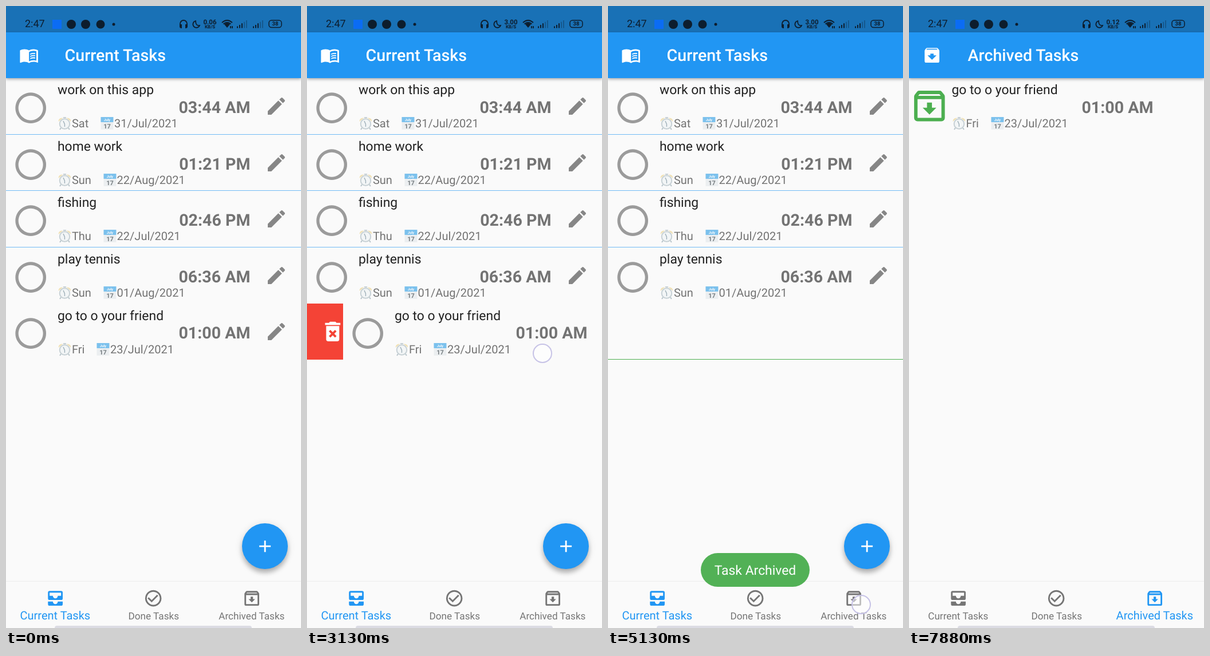
Write an HTML page that moves like this. It is 515 by 1087 pixels and loops after 8 s.

```html
<!DOCTYPE html>
<html lang="en">
<head>
<meta charset="utf-8">
<title>Task list</title>
<style>
  html, body { margin: 0; width: 100%; height: 100%; overflow: hidden; background: #fafafa; }
  #stage { position: absolute; inset: 0; overflow: hidden; font: 20px/0 Roboto, sans-serif; color: #737373;
    text-rendering: geometricPrecision; }
  #stage div, #stage svg { position: absolute; }
  .text { white-space: pre; line-height: 0; }
  .mid { transform: translateX(-50%); }

  #status { width: 100%; height: 46px; background: #1971b6; color: #0d1d2d; }
  #bar { top: 46px; width: 100%; height: 80px; background: #2196f3; box-shadow: 0 2px 5px #0005; }
  .heading { left: 102.6px; top: 40.2px; font-size: 28.6px; font-weight: 500; color: #fff; }

  .page { top: 126px; width: 100%; height: 880px; }
  .row, .front { width: 515px; height: 97.4px; overflow: hidden; }
  .front { background: #fafafa; }
  .title { top: 21.2px; font-size: 22.9px; color: #212121; }
  #stage .when { top: 79.2px; display: flex; align-items: center; height: 0; white-space: pre; }
  #stage .when svg { position: static; flex: none; opacity: .62; }
  .time { right: 88.5px; top: 51.1px; font-size: 28.6px; font-weight: 700; }
  .rule { width: 100%; height: 1px; background: #72bbf4; }
  .under { width: 100%; height: 100%; }
  .cover { width: 100%; height: 100%; background: #fafafa; transform-origin: bottom; }

  #fab { left: 412px; top: 904px; width: 80px; height: 80px; border-radius: 50%; background: #2196f3;
    box-shadow: 0 7px 10px -1px #0004, 0 2px 14px #0002; }
  #nav { top: 1006px; width: 100%; height: 81px; background: #fafafa; box-shadow: 0 -1px 1px #0000000c; }
  .tab { width: 171.67px; height: 81px; top: 0; color: #757575; }
  .label { width: 100%; top: 59px; text-align: center; transform: scale(.857); transform-origin: 50% 9px; }
  #home { left: 85px; top: 1083px; width: 344px; height: 8px; border-radius: 4px; background: #dcdce4; }
  #toast { left: 162px; top: 956px; width: 190px; height: 59px; border-radius: 30px; background: #4caf50f6; }
  .touch { width: 30px; height: 30px; margin: -17px; border: 2px solid #c6c2e6; border-radius: 50%; background: #fff8; }

  .swipeAway { animation: swipeAway 8s linear infinite; }
  .peek { animation: peek 8s linear infinite; }
  .leave { animation: leave 8s linear infinite; }
  .enter { animation: enter 8s linear infinite; }
  .red { animation: red 8s linear infinite; }
  .cover { animation: cover 8s linear infinite; }
  .lastRule { animation: lastRule 8s linear infinite; }
  #toast { animation: toast 8s linear infinite; }
  .off { animation: off 8s linear infinite; }
  .on { animation: on 8s linear infinite; }
  .off .label { animation: shrink 8s linear infinite; }
  .on .label { animation: grow 8s linear infinite; }
  #touch1 { left: 348px; top: 607px; animation: swipeAway 8s linear infinite, touch1 8s linear infinite; }
  #touch2 { left: 442px; top: 1046px; animation: touch2 8s linear infinite; }
  #touch3 { left: 390px; top: 217px; animation: peek 8s linear infinite, touch3 8s linear infinite; }

  @keyframes swipeAway {
    0%, 34.4% { transform: none; }
    37.5% { transform: translateX(50px); }
    39.06% { transform: translateX(63px); }
    40.6% { transform: translateX(66px); }
    43.75% { transform: none; }
    46.9% { transform: translateX(-140px); }
    50% { transform: translateX(-280px); }
    52.5%, to { transform: translateX(-516px); }
  }
  @keyframes peek {
    0%, 71.9% { transform: none; }
    78.12% { transform: translateX(-195px); }
    79.7% { transform: translateX(-205px); }
    84.4%, to { transform: none; }
  }
  @keyframes leave { 0%, 65.6% { opacity: 1; } 65.61%, to { opacity: 0; } }
  @keyframes enter { 0%, 65.6% { opacity: 0; } 65.61%, to { opacity: 1; } }
  @keyframes red { 0%, 43.75% { opacity: 1; } 43.76%, to { opacity: 0; } }
  @keyframes cover { 0%, 55% { transform: scaleY(0); } 58.7%, to { transform: none; } }
  @keyframes lastRule { 0%, 58.7% { opacity: 1; } 58.71%, to { opacity: 0; } }
  @keyframes toast { 0%, 58% { opacity: 0; } 60.5%, 84.4% { opacity: 1; } 87.5%, to { opacity: 0; } }
  @keyframes off { 0%, 65.6% { color: #2196f3; } 68%, to { color: #757575; } }
  @keyframes on { 0%, 65.6% { color: #757575; } 68%, to { color: #2196f3; } }
  @keyframes shrink { 0%, 65.6% { transform: none; } 68%, to { transform: scale(.857); } }
  @keyframes grow { 0%, 65.6% { transform: scale(.857); } 68%, to { transform: none; } }
  @keyframes touch1 { 0%, 32.8% { opacity: 0; } 32.81%, 50% { opacity: 1; } 50.01%, to { opacity: 0; } }
  @keyframes touch2 { 0%, 62.4% { opacity: 0; } 62.41%, 65.6% { opacity: 1; } 65.61%, to { opacity: 0; } }
  @keyframes touch3 { 0%, 70.3% { opacity: 0; } 70.31%, 84.4% { opacity: 1; } 84.41%, to { opacity: 0; } }
</style>
</head>
<body>
<div id="stage"></div>
<script>
const LOOP = 8000, STEP = 125, PITCH = 98.6;

const box = 'M20.5 5.2l-1.4-1.7Q18.7 3 18 3H6Q5.3 3 4.8 3.5L3.5 5.2Q3 5.8 3 6.5V19a2 2 0 0 0 2 2h14a2 2 0 0 0 2-2V6.5Q21 5.8 20.5 5.2z';
const shapes = {
  book: 'M21 5c-3-.9-6.6-.7-9 1C9 4 4 4 1 6v14.65q.1.6.75.45C5 19.6 9 19.5 12 21.5c3-1.8 7-2 10.25-.45q.65.1.75-.45V6q-.9-.7-2-1zM21 18.5c-3-.9-6.5-.5-9 1V8c2.5-1.5 6-1.9 9-1zM13.5 10q3-1.4 6-.8v1.3q-3-.6-6 .8zM13.5 12.7q3-1.4 6-.8v1.3q-3-.6-6 .8zM13.5 15.4q3-1.4 6-.8v1.3q-3-.6-6 .8z',
  pencil: 'M3 17.25V21h3.75L17.8 9.94l-3.75-3.75zM20.7 7q.6-.7 0-1.4l-2.3-2.3q-.7-.6-1.4 0l-1.9 1.8 3.75 3.75z',
  ring: 'M12 2a10 10 0 1 0 .01 0zM12 4a8 8 0 1 1-.01 0z',
  inbox: 'M5 3h14a2 2 0 0 1 2 2v7a2 2 0 0 1-2 2H5a2 2 0 0 1-2-2V5a2 2 0 0 1 2-2zM5 5v4h4a3 3 0 0 0 6 0h4V5zM3 16h6a3 3 0 0 0 6 0h6v3a2 2 0 0 1-2 2H5a2 2 0 0 1-2-2z',
  archive: box + 'M6.2 5h11.6l.8 1H5.4zM5 19V8h14v11zM10.55 10v3H8l4 4 4-4h-2.55v-3z',
  archiveSolid: box + 'M12 17.5L6.5 12H10v-2h4v2h3.5zM5.1 5l.8-1h12l.9 1z',
  trash: 'M6 7h12v12a2 2 0 0 1-2 2H8a2 2 0 0 1-2-2zM8.46 11.9L10.6 14l-2.1 2.1 1.4 1.4L12 15.4l2.1 2.1 1.4-1.4L13.4 14l2.1-2.1-1.4-1.4L12 12.6l-2.1-2.1zM15.5 4l-1-1h-5l-1 1H5v2h14V4z',
  undo: 'M12.5 8c-2.65 0-5.05 1-6.9 2.6L2 7v9h9l-3.6-3.6c1.4-1.2 3.1-1.9 5.1-1.9 3.5 0 6.5 2.3 7.6 5.5l2.4-.8C21 11 17.1 8 12.5 8z',
  plus: 'M11 5h2v6h6v2h-6v6h-2v-6H5v-2h6z'
};
shapes.done = shapes.ring + 'M16.6 7.6L10 14.2l-3.6-3.6L5 12l5 5 8-8z';

const icon = (name, size, cx, cy, color = 'currentColor') =>
  `<svg width="${size}" height="${size}" viewBox="0 0 24 24" style="left:${cx - size / 2}px;top:${cy - size / 2}px">
    <path d="${shapes[name]}" fill="${color}" fill-rule="evenodd"/></svg>`;

const clock = `<svg width="24.9" height="24" viewBox="0 0 25 24">
  <path d="M6 20l-2 3M19 20l2 3" stroke="#90a4ae" stroke-width="2"/>
  <path d="M1.5 9q0-7 8-6.5zM23.5 9q0-7-8-6.5z" fill="#ecd38a"/>
  <path d="M10 2h5" stroke="#a5b5bd" stroke-width="2"/>
  <circle cx="12.5" cy="13" r="8.8" fill="#eef2f4" stroke="#a9b8bf" stroke-width="2"/>
  <path d="M10 8l2.5 5.5V18" fill="none" stroke="#607d8b" stroke-width="1.3"/></svg>`;
const calendar = `<svg width="24.9" height="24" viewBox="0 0 25 24" font-family="Roboto, sans-serif" font-weight="700" text-anchor="middle">
  <path d="M1.500 1h22v22h-22z" fill="#e3e8ea"/><path d="M1.500 1h22v9h-22z" fill="#2f9fe6"/>
  <text x="12.5" y="7.5" font-size="6" fill="#fff">July</text>
  <text x="12.5" y="21" font-size="11" fill="#263238">17</text></svg>`;

const details = ([title, day, date, time], x) => `
  <div class="text title" style="left:${x}px">${title}</div>
  <div class="when" style="left:${x}px">${clock}<span>${day}    </span>${calendar}<span>${date}</span></div>
  <div class="text time">${time}</div>`;

const tasks = [
  ['work on this app', 'Sat', '31/Jul/2021', '03:44 AM'],
  ['home work', 'Sun', '22/Aug/2021', '01:21 PM'],
  ['fishing', 'Thu', '22/Jul/2021', '02:46 PM'],
  ['play tennis', 'Sun', '01/Aug/2021', '06:36 AM'],
  ['go to o your friend', 'Fri', '23/Jul/2021', '01:00 AM']
];
const last = tasks.length - 1;

const under = (color, kind, name, x) =>
  `<div class="under ${kind}" style="background:${color}">${icon(name, 45.8, x, 48.8, '#fff')}</div>`;

const taskRow = (task, i) => {
  const moving = i === last;
  const front = `<div class="front ${moving ? 'swipeAway' : ''}">${details(task, 90)}
    ${icon('ring', 64.4, 43.5, 52.3, '#9b9b9b')}${icon('pencil', 40, 472, 49, '#868686')}</div>`;
  return `<div class="row" style="top:${i * PITCH}px">` +
    (moving ? under('#4caf50', '', 'archive', 471) + under('#f44336', 'red', 'trash', 44.5) : '') +
    front + (moving ? '<div class="cover"></div>' : '') + '</div>' +
    (moving ? '' : `<div class="rule ${i === last - 1 ? 'lastRule' : ''}" style="top:${(i + 1) * PITCH - 0.8}px"></div>`);
};

const tab = (name, label, i, kind) =>
  `<div class="tab ${kind}" style="left:${i * 171.67}px">${icon(name, 34.3, 85.8, 29.3)}<div class="text label">${label}</div></div>`;

const signal = x => [0, 1, 2, 3, 4].map(i =>
  `<path d="M${x + i * 4} 38.5v${-3 - i * 2.6}" stroke-width="2" opacity="${i < 3 ? 1 : .3}"/>`).join('');

const statusIcons = `<svg width="515" height="46" fill="none" stroke="#0d1d2d" stroke-width="1.8">
  <g stroke="none" fill="#0d1d2d">
    <path d="M81 24h16v16H81z" fill="#0b6cf4"/>
    <circle cx="114" cy="32" r="8"/><circle cx="139" cy="32" r="8"/><circle cx="165" cy="32" r="7.5"/><circle cx="188" cy="32" r="2.5"/>
    <path d="M303 32h4v7q-4 0-4-3zM317 32h-4v7q4 0 4-3z"/>
    <path d="M381 32q5-4.5 10 0l-5 6z"/>
  </g>
  <path d="M304 34v-3a6 6 0 0 1 12 0v3M331 26a6 6 0 1 0 7 8q-7 1-7-8z"/>
  <path d="M377 29q9-8 18 0M379.5 31.5q6.5-5.5 13 0M392 35v4m3 0v-4"/>
  ${signal(404)}${signal(432)}
  <rect x="459" y="25" width="22" height="12.5" rx="4.5" stroke-width="1.5"/>
</svg>`;

const small = (x, y, size, text, id = '') =>
  `<div class="text mid" ${id} style="left:${x}px;top:${y}px;font-size:${size}px;font-weight:700">${text}</div>`;

document.getElementById('stage').innerHTML = `
  <div class="page leave">${tasks.map(taskRow).join('')}</div>
  <div class="page enter"><div class="row">
    ${under('#4caf50', '', 'undo', 471)}
    <div class="front peek">${details(tasks[last], 74.5)}${icon('archive', 71.5, 36, 48.5, '#4caf50')}</div>
  </div></div>
  <div id="status">${statusIcons}
    <div class="text" style="left:33px;top:32px;font-size:18px">2:47</div>
    ${small(356, 27.5, 11.5, '0.06', 'id="speed"')}${small(356, 37, 8, 'KB/S')}${small(470, 31.5, 9.5, '38')}
  </div>
  <div id="bar">
    <div class="leave">${icon('book', 34.3, 40, 40, '#fff')}</div>
    <div class="enter">${icon('archiveSolid', 34.3, 40, 40, '#fff')}</div>
    <div class="text heading leave">Current Tasks</div>
    <div class="text heading enter">Archived Tasks</div>
  </div>
  <div id="fab" class="leave">${icon('plus', 34.3, 40, 40, '#fff')}</div>
  <div id="nav">
    ${tab('inbox', 'Current Tasks', 0, 'off')}${tab('done', 'Done Tasks', 1, '')}${tab('archive', 'Archived Tasks', 2, 'on')}
  </div>
  <div id="home"></div>
  <div id="toast"><div class="text mid" style="left:95px;top:31px;font-size:22.9px;color:#fff">Task Archived</div></div>
  <div id="touch1" class="touch"></div><div id="touch2" class="touch"></div><div id="touch3" class="touch"></div>`;

// Hold every pose for one step, like an 8 fps screen recording.
const motions = document.getAnimations();
const speed = document.getElementById('speed');
motions.forEach(m => m.pause());

function tick() {
  const t = Math.floor(performance.now() % LOOP / STEP) * STEP;
  motions.forEach(m => { m.currentTime = t; });
  speed.textContent = t < 2625 ? '0.06' : t < 6625 ? '3.00' : '0.12';
  requestAnimationFrame(tick);
}
tick();
</script>
</body>
</html>
```
